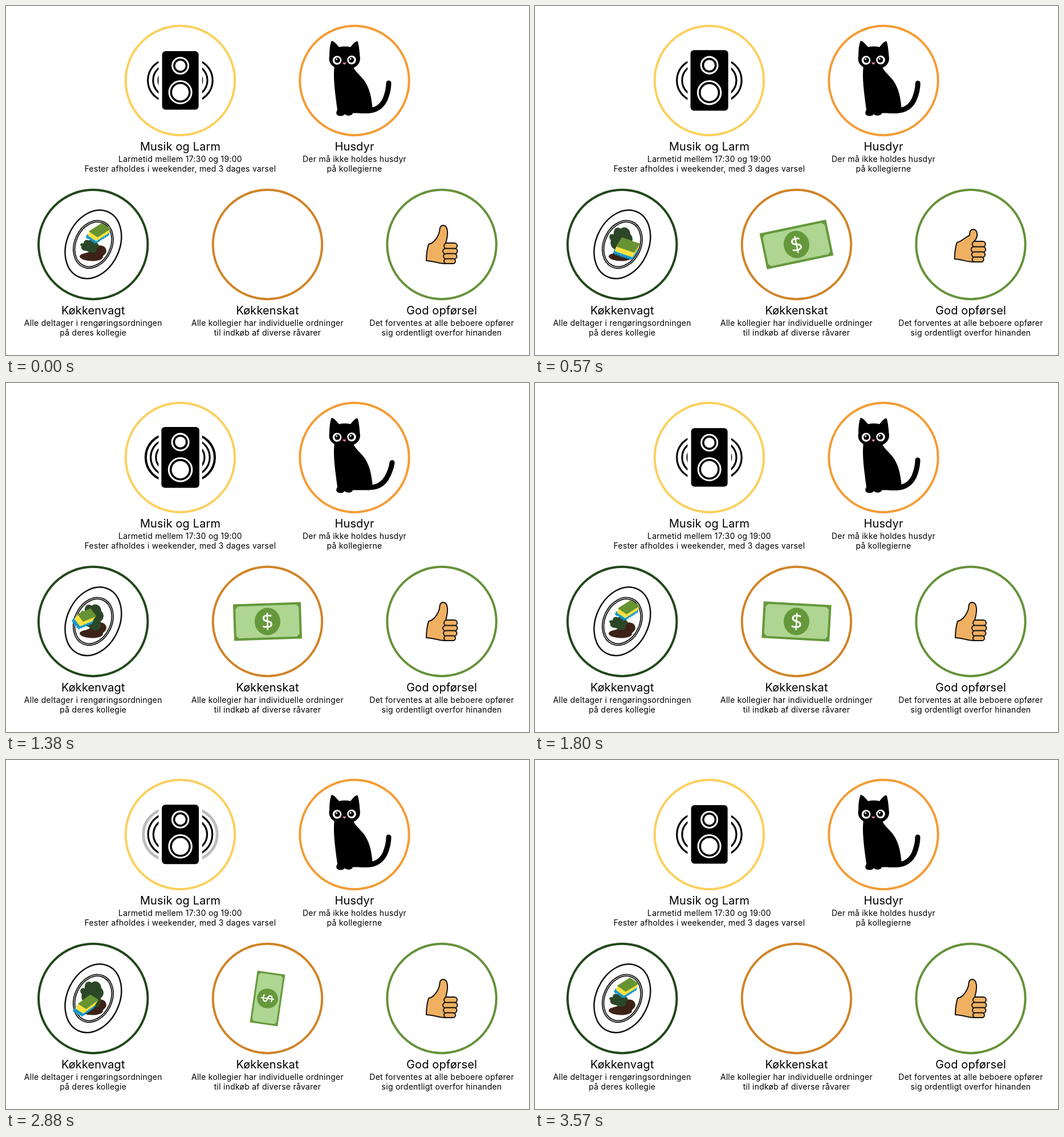
Animation, 917 px wide and 611 px high, one loop 3.6 s. Source, as an HTML page:

```html
<!DOCTYPE html>
<html lang="da">
<head>
<meta charset="utf-8">
<title>Kollegieregler</title>
<style>
html, body { margin: 0; width: 100%; height: 100%; overflow: hidden; background: #fff; }
svg { display: block; width: 917px; height: 611px; }
text { font-family: Inter, "Open Sans", sans-serif; text-anchor: middle; }
.head { font-size: 20px; letter-spacing: .12px; }
.line { font-size: 14px; letter-spacing: .25px; }
</style>
</head>
<body>
<svg viewBox="0 0 917 611">
  <defs>
    <clipPath id="sides"><path d="M200 60H267.500V200H200ZM344 60H410V200H344Z"/></clipPath>
  </defs>
  <g id="cards"></g>

  <g id="waves" fill="none" stroke="#000" clip-path="url(#sides)"></g>
  <g id="speaker">
    <rect x="273.700" y="79" width="64" height="102.500" rx="6"/>
    <g fill="none" stroke="#fff" stroke-width="3">
      <circle cx="305.700" cy="104.500" r="14"/>
      <circle cx="305.700" cy="151" r="19.500"/>
    </g>
    <circle cx="305.700" cy="104.500" r="9" fill="#fff"/>
    <circle cx="305.700" cy="151" r="14.500" fill="#fff"/>
  </g>

  <path id="tail" d="M620 183C645 185.500 657 179 664.500 164C669 153 671 145 671 135" fill="none" stroke="#000" stroke-width="9" stroke-linecap="round"/>
  <path d="M576 104C573 125 577 152 581 182C577 188 580 192.500 586 192.500C591 192.500 593 191 594 189C596 193 607 193 608 187.500H634C643 188 643 181 642 173C640 155 636 141 627 129C619 119 610 113 608 104Z"/>
  <path d="M570.500 61.500Q573 59 584 72Q594 69.500 604 72Q613 60 616.500 62Q619 68 620.500 88C623 102 612 111 594 111C576 111 564 102 567 88Q567 70 570.500 61.500Z"/>
  <g id="eyes">
    <circle cx="580.500" cy="95" r="7.800" fill="#fff"/>
    <circle cx="606" cy="94.500" r="7.800" fill="#fff"/>
    <circle cx="581" cy="94.800" r="4.800"/>
    <circle cx="605.500" cy="94.300" r="4.800"/>
    <circle cx="579.600" cy="93" r="1.500" fill="#fff"/>
    <circle cx="604.100" cy="92.500" r="1.500" fill="#fff"/>
  </g>
  <path d="M590.500 99.500H596L593.300 102.500Z" fill="#f2859b" stroke="#f2859b" stroke-linejoin="round"/>

  <g transform="translate(153 417.300) rotate(25)" fill="none" stroke="#111">
    <ellipse rx="46" ry="62.500" stroke-width="2.500"/>
    <ellipse rx="32.900" ry="43.500" stroke-width="1.800"/>
    <ellipse rx="30.200" ry="40.700" stroke-width="1.800"/>
  </g>
  <path fill="#3d2317" d="M129 439C130 432 140 434 146 430C154 418 172 415 175.500 426C178 435 168 436 170 441C162 450 132 447 129 439Z"/>
  <path id="greens" fill="#2c4727" d="M133 410C127 404 132 397 138 400C137 390 144 385 150 390C156 384 167 389 167 399C173 405 172 413 166 417C168 425 165 432 158 433C150 434 147 426 141 426C134 425 131 416 133 410Z"/>
  <path id="cloth" fill="#1499d3" stroke="#1499d3" stroke-width="3.500" stroke-dasharray="0 4.500" stroke-linecap="round"/>
  <path id="foam" fill="#fde03f"/>
  <path id="scrub" fill="#669433"/>

  <g id="bill">
    <rect x="-57.500" y="-30" width="115" height="60" fill="#aed592" stroke="#65983b" stroke-width="4"/>
    <path d="M-56 -29h6l-6 6zM56 -29h-6l6 6zM-56 29h6l-6 -6zM56 29h-6l6 -6z" fill="#65983b"/>
    <ellipse rx="22.500" ry="24" fill="#65983b"/>
    <text y="13" fill="#fff" style="font-family:'Noto Sans',sans-serif;font-size:37px">$</text>
  </g>

  <g id="hand" fill="#f0b062" stroke="#111" stroke-width="2" stroke-linejoin="round">
    <path id="palm"/>
    <rect x="768" y="415" width="23" height="10" rx="5"/>
    <rect x="766" y="424.500" width="25.500" height="9.500" rx="4.700"/>
    <rect x="767" y="433.500" width="23.500" height="9.500" rx="4.700"/>
    <rect x="768" y="442.500" width="20" height="8.500" rx="4.200"/>
  </g>
</svg>
<script>
const NS = "http://www.w3.org/2000/svg";
const LOOP = 3600, STEP = 30;
const $ = id => document.getElementById(id);

function set(el, attrs) {
  for (const k in attrs) el.setAttribute(k, attrs[k]);
  return el;
}
function add(parent, tag, attrs, text) {
  const el = set(document.createElementNS(NS, tag), attrs);
  if (text) el.textContent = text;
  return parent.appendChild(el);
}

const cards = [
  [305.5, 130.5, "#fbd05d", "Musik og Larm", "Larmetid mellem 17:30 og 19:00", "Fester afholdes i weekender, med 3 dages varsel"],
  [611, 130.5, "#f49c36", "Husdyr", "Der må ikke holdes husdyr", "på kollegierne"],
  [152.8, 417.5, "#21481a", "Køkkenvagt", "Alle deltager i rengøringsordningen", "på deres kollegie"],
  [458.5, 417.5, "#d08428", "Køkkenskat", "Alle kollegier har individuelle ordninger", "til indkøb af diverse råvarer"],
  [764, 417.5, "#65923a", "God opførsel", "Det forventes at alle beboere opfører", "sig ordentligt overfor hinanden"]
];
for (const [x, y, color, title, a, b] of cards) {
  add($("cards"), "circle", { cx: x, cy: y, r: 95.7, fill: "none", stroke: color, "stroke-width": 4 });
  add($("cards"), "text", { x, y: y + 122.5, class: "head" }, title);
  add($("cards"), "text", { x, y: y + 142.5, class: "line" }, a);
  add($("cards"), "text", { x, y: y + 159, class: "line" }, b);
}

// three rings on each side of the speaker
const rings = [0, 1, 2].map(() => [286, 325].map(cx => add($("waves"), "circle", { cx, cy: 130.3 })));

const clamp = v => Math.max(0, Math.min(1, v));
const swell = p => p > 0 && p < 1 ? (1 - Math.cos(2 * Math.PI * p)) / 2 : 0;

function drawSpeaker(t) {
  const s = 1 + .04 * swell(t % 900 / 900);
  set($("speaker"), { transform: `translate(305.7 130.3) scale(${s}) translate(-305.7 -130.3)` });
  const p = t % 600 / 600, out = Math.sin(p * Math.PI / 2);
  rings.forEach((pair, i) => {
    const last = i === 2, width = last ? 3.2 + 1.8 * out : 3.2;
    const r = 20.5 + 9.2 * (i + out) - width / 2;
    pair.forEach(c => set(c, { r, "stroke-width": width, opacity: last ? clamp((.91 - p) * 2.4) : 1 }));
  });
}

function drawCat(t) {
  const side = Math.floor(t / 600) % 2 ? -1 : 1;
  const angle = t < 2400 ? 11.5 * side * swell(t % 600 / 600) : 0;
  set($("tail"), { transform: `rotate(${angle} 640 183)` });
  const open = 1 - .95 * swell((t - 3120) / 300);
  set($("eyes"), { transform: `translate(0 ${95 * (1 - open)}) scale(1 ${open})` });
}

// time, corner, long edge, short edge, depth
const poses = [
  [0, 146, 394, 22, -14, 15, 10, -4, 11],
  [600, 153, 406, 32, 12, -11, 15, -5, 13],
  [1080, 127, 426, 21, -15, 14, 9, -8, 13],
  [1380, 126, 404, 22, -9, 10, 13, -9, 13],
  [1800, 146, 394, 22, -14, 15, 10, -4, 11]
];
function slab(pose, from, to) {
  const [, x, y, ux, uy, vx, vy, ex, ey] = pose;
  let d = "";
  for (let i = 0; i <= 10; i++) {
    const k = from + (to - from) * i / 10;
    d += `M${x + ex * k} ${y + ey * k}l${ux} ${uy}l${vx} ${vy}l${-ux} ${-uy}Z`;
  }
  return d;
}
function drawPlate(t) {
  t %= 1800;
  const i = poses.findIndex(p => p[0] > t), a = poses[i - 1], b = poses[i];
  const k = (t - a[0]) / (b[0] - a[0]);
  const pose = a.map((v, j) => v + (b[j] - v) * k);
  set($("cloth"), { d: slab(pose, .65, 1) });
  set($("foam"), { d: slab(pose, 0, .7) });
  set($("scrub"), { d: slab(pose, 0, .08) });
  // the sponge pushes the greens down and to the left
  const near = clamp(1 - Math.min(t, 1800 - t) / 400), push = near * near * (3 - 2 * near);
  set($("greens"), {
    transform: `translate(130 431) scale(${1 - .2 * push} ${1 - .5 * push}) translate(-130 -431)`
  });
}

function drawBill(t) {
  const enter = clamp(t / 550), leave = clamp((t - 2750) / 560);
  const angle = .01215 * Math.min(t, 2750) - 18.7 + 360 * (enter - 1 + leave);
  set($("bill"), {
    transform: `translate(458.5 417.5) rotate(${angle}) scale(${enter * (1 - leave)})`
  });
}

function drawHand(t) {
  const bend = swell(t / 1080), push = 6 * swell((t - 600) / 480);
  set($("hand"), { transform: `translate(${push - 1.3 * bend} ${-3 * bend})` });
  const at = (x, y) => `${x + 3 * bend} ${y + 10 * bend}`;
  set($("palm"), {
    d: `M741 417C749 416 757 406 ${at(760, 395)}C${at(760.5, 387)} ${at(762, 384)} ${at(767, 384)}` +
       `C${at(775, 385)} ${at(776, 398)} 771 415H780V451H769C757 451 750 446 737 446Q737 430 741 417Z`
  });
}

function frame(now) {
  const t = Math.floor(now / STEP) * STEP % LOOP;
  drawSpeaker(t);
  drawCat(t);
  drawPlate(t);
  drawBill(t);
  drawHand(t);
  requestAnimationFrame(frame);
}
frame(0);
</script>
</body>
</html>
```
